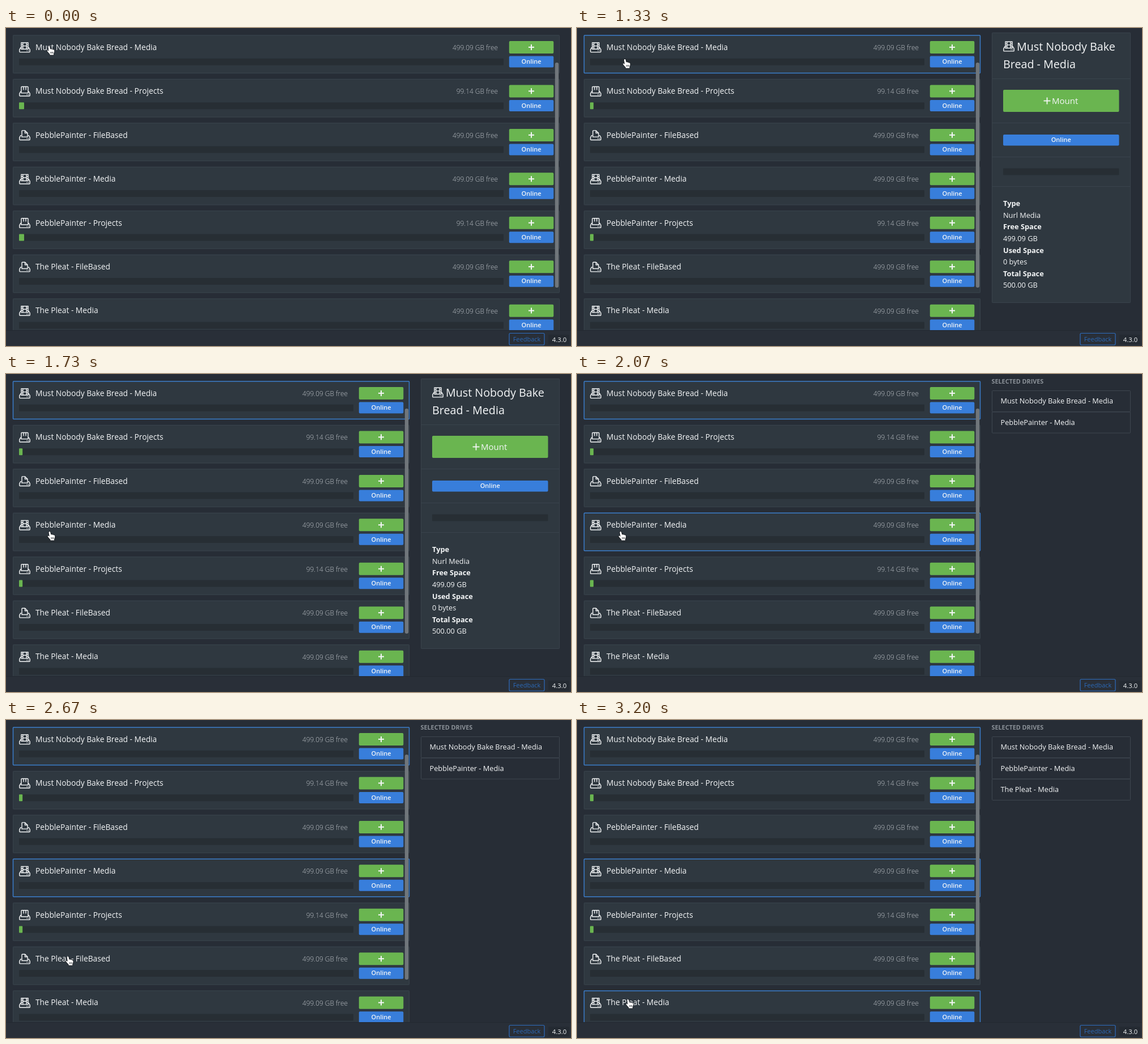
Write an HTML page with a canvas that moves like this. It is 997 px wide and 561 px high and loops after 3.47 s.

```html
<!DOCTYPE html>
<html lang="en">
<head>
<meta charset="utf-8">
<title>Drives</title>
<style>
html, body { margin: 0; width: 100%; height: 100%; overflow: hidden; background: #272d36; }
canvas { display: block; }
</style>
</head>
<body>
<canvas id="stage" width="997" height="561"></canvas>
<script>
const ctx = document.getElementById('stage').getContext('2d');
const LOOP = 3470, OPEN = 1000, SECOND = 2070, THIRD = 3200;
const C = {
  bg: '#272d36', card: '#2f3840', edge: '#39434c', track: '#272e34', green: '#6ab550',
  blue: '#387edb', pick: '#3b7cc9', white: '#f4f6f7', soft: '#bdc2c7', thumb: '#70767b'
};
const SHOW = 'Must Nobody Bake Bread', COOK = 'PebblePainter', HOUSE = 'The Pleat';
const DRIVES = [
  [SHOW, 'Media'], [SHOW, 'Projects'],
  [COOK, 'FileBased'], [COOK, 'Media'], [COOK, 'Projects'],
  [HOUSE, 'FileBased'], [HOUSE, 'Media']
].map(([name, kind]) => ({ kind, label: `${name} - ${kind}` }));
const DETAILS = [
  ['Type', 'Nurl Media'], ['Free Space', '499.09 GB'],
  ['Used Space', '0 bytes'], ['Total Space', '500.00 GB']
];

const BASE = new Path2D('M4 9.5H2.8L.8 13V16.4Q.8 17.4 1.8 17.4H18.2Q19.2 17.4 19.2 16.4V13L17.2 9.5H16M13.4 14.9H14.6M16 14.9H17.2');
const ICONS = {
  Media: new Path2D('M4 .8H16V12H4ZM6.8 .8V12M13.2 .8V12M6.8 6.4H13.2M4 4.4H6.8M4 8.2H6.8M13.2 4.4H16M13.2 8.2H16'),
  Projects: new Path2D('M4 12V1.8Q4 .8 5 .8H15Q16 .8 16 1.8V12ZM8 .8V6.5M12 .8V6.5'),
  FileBased: new Path2D('M5 12V1.8Q5 .8 6 .8H10.5L15 5.3V12ZM10.5 .8V5.3H15')
};
const HAND = new Path2D('M3 2.5C3 .6 5.4 .4 5.8 2.2L6.8 6.6C7.2 5.6 9 5.7 9.3 6.9C9.8 6.2 11.3 6.4 11.5 7.6C12.3 7 13.6 7.5 13.7 8.8C13.9 11 13.5 12.5 12.6 14V16.5H6L5.7 15C4.2 13.5 2.6 11.6 1.4 10C.6 8.8 2 8 3 8.8L4.2 9.8Z');
const CREASES = new Path2D('M7.4 11V14M9.4 11V14M11.3 11V14');

function box(x, y, w, h, fill, r = 0) {
  ctx.fillStyle = fill;
  ctx.beginPath();
  ctx.roundRect(x, y, w, h, r);
  ctx.fill();
}

function frame(x, y, w, h, color, width = 1, r = 1) {
  ctx.strokeStyle = color;
  ctx.lineWidth = width;
  ctx.beginPath();
  ctx.roundRect(x + .5, y + .5, w - 1, h - 1, r);
  ctx.stroke();
}

function text(str, x, y, size, { color = C.white, weight = 400, align = 'left' } = {}) {
  ctx.font = `${weight} ${size}px "Open Sans", sans-serif`;
  ctx.fillStyle = color;
  ctx.textAlign = align;
  ctx.fillText(str, x, y);
}

function plus(x, y, size, width) {
  box(x - size / 2, y - width / 2, size, width, C.white);
  box(x - width / 2, y - size / 2, width, size, C.white);
}

function icon(kind, x, y) {
  ctx.save();
  ctx.translate(x, y);
  ctx.strokeStyle = C.white;
  ctx.lineWidth = 1.4;
  ctx.stroke(BASE);
  ctx.stroke(ICONS[kind]);
  ctx.restore();
}

function online(x, y, w, h) {
  box(x, y, w, h, C.blue, 2);
  text('Online', x + w / 2, y + h / 2 + 3.7, 11, { weight: 600, align: 'center' });
}

function row({ kind, label }, y, right, picked) {
  const project = kind === 'Projects';
  const btn = right - 89.2, track = right - 122;
  box(12, y, right - 12, 68, C.card, 1);
  frame(12, y + .3, right - 12, 67.5, picked ? C.pick : C.edge, picked ? 1.5 : 1);
  icon(kind, 23, y + 13);
  text(label, 52, y + 26.5, 13.75);
  text(project ? '99.14 GB free' : '499.09 GB free', right - 109, y + 26.8, 11.9,
    { color: C.soft, weight: 300, align: 'right' });
  box(23, y + 41.5, track, 12, C.track, 1);
  if (project) box(23, y + 41.5, track * .0105, 12, C.green, 1);
  box(btn, y + 10.8, 78.5, 22, C.green, 2);
  plus(btn + 39.2, y + 21.7, 10, 2);
  online(btn, y + 37.3, 78.5, 20);
}

function list(right, picked) {
  ctx.save();
  ctx.beginPath();
  ctx.rect(0, 0, 997, 533);
  ctx.clip();
  DRIVES.forEach((d, i) => row(d, 12.2 + 77.45 * i, right, picked.includes(i)));
  ctx.restore();
  box(right - 8.2, 61, 6.4, 397, C.thumb, 3);
}

function details() {
  box(732, 8, 245, 477, C.card, 1);
  frame(732, 8, 245, 477, C.edge);
  for (const y of [89, 167, 227, 279]) box(732, y, 245, 1, C.edge);
  icon('Media', 752, 23.5);
  const words = SHOW.split(' '), last = words.pop();
  text(words.join(' '), 776, 40, 19.7);
  text(`${last} - Media`, 752, 71, 19.7);
  box(752, 109, 204.5, 39, C.green, 2);
  plus(829.5, 128.5, 12, 1.8);
  text('Mount', 838, 134, 15);
  online(752, 188, 204.5, 19.5);
  box(752, 247.5, 204.5, 12, C.track, 1);
  DETAILS.forEach(([name, value], i) => {
    const y = 314.3 + 41.15 * i;
    text(name, 752, y, 12.75, { weight: 700 });
    text(value, 752, y + 20.6, 12.75);
  });
}

function selection(picked) {
  text('SELECTED DRIVES', 731.5, 17, 10.8, { color: '#8a9097', weight: 700 });
  picked.forEach((d, i) => {
    const y = 29 + 37.3 * i;
    frame(732, y, 245, 38.3, '#3f4750');
    text(DRIVES[d].label, 747.5, y + 23.3, 12.75);
  });
}

function footer() {
  box(0, 534, 997, 27, '#292f38');
  box(0, 533, 997, 1, '#222830');
  frame(887.5, 538, 63, 21.5, '#2d6dbf', 1.2, 2);
  text('Feedback', 919, 552.5, 11, { color: '#2c69b6', align: 'center' });
  box(957, 541, 37, 17, '#242a32', 2);
  text('4.3.0', 976.5, 553.8, 11.3, { align: 'center' });
}

const smooth = t => t * t * (3 - 2 * t);

// Share of a move done, advancing in equal ticks; the first tick lands on start.
function ticks(t, start, end, n) {
  if (t < start) return 0;
  return Math.min(n, 1 + Math.floor((t - start + 3) / (end - start) * (n - 1))) / n;
}

function handAt(t) {
  if (t < 2330) {
    const u = ticks(t, 1270, 1730, 8);
    return [71.5 + u + 22 * Math.sin(Math.PI * u), 31 + 246 * smooth(u ** .8)];
  }
  const u = ticks(t, 2330, 2930, 10);
  return [72.5 + 13 * u + 27 * Math.sin(Math.PI * u) ** 2, 277 + 215 * smooth(u)];
}

function hand(x, y) {
  ctx.save();
  ctx.translate(x, y);
  ctx.lineJoin = 'round';
  ctx.strokeStyle = '#15191e';
  ctx.lineWidth = 1.6;
  ctx.stroke(HAND);
  ctx.fillStyle = '#fff';
  ctx.fill(HAND);
  ctx.lineWidth = .8;
  ctx.stroke(CREASES);
  ctx.restore();
}

function draw(now) {
  const t = now % LOOP;
  const picked = [0, 3, 6].slice(0, (t >= OPEN) + (t >= SECOND) + (t >= THIRD));
  box(0, 0, 997, 561, C.bg);
  list(picked.length ? 712 : 977, picked);
  if (picked.length === 1) details();
  if (picked.length > 1) selection(picked);
  footer();
  hand(...handAt(t));
}

let start;
function tick(now) {
  start ??= now;
  draw(Math.max(0, now - start));
  requestAnimationFrame(tick);
}
draw(0);
requestAnimationFrame(tick);
</script>
</body>
</html>
```
